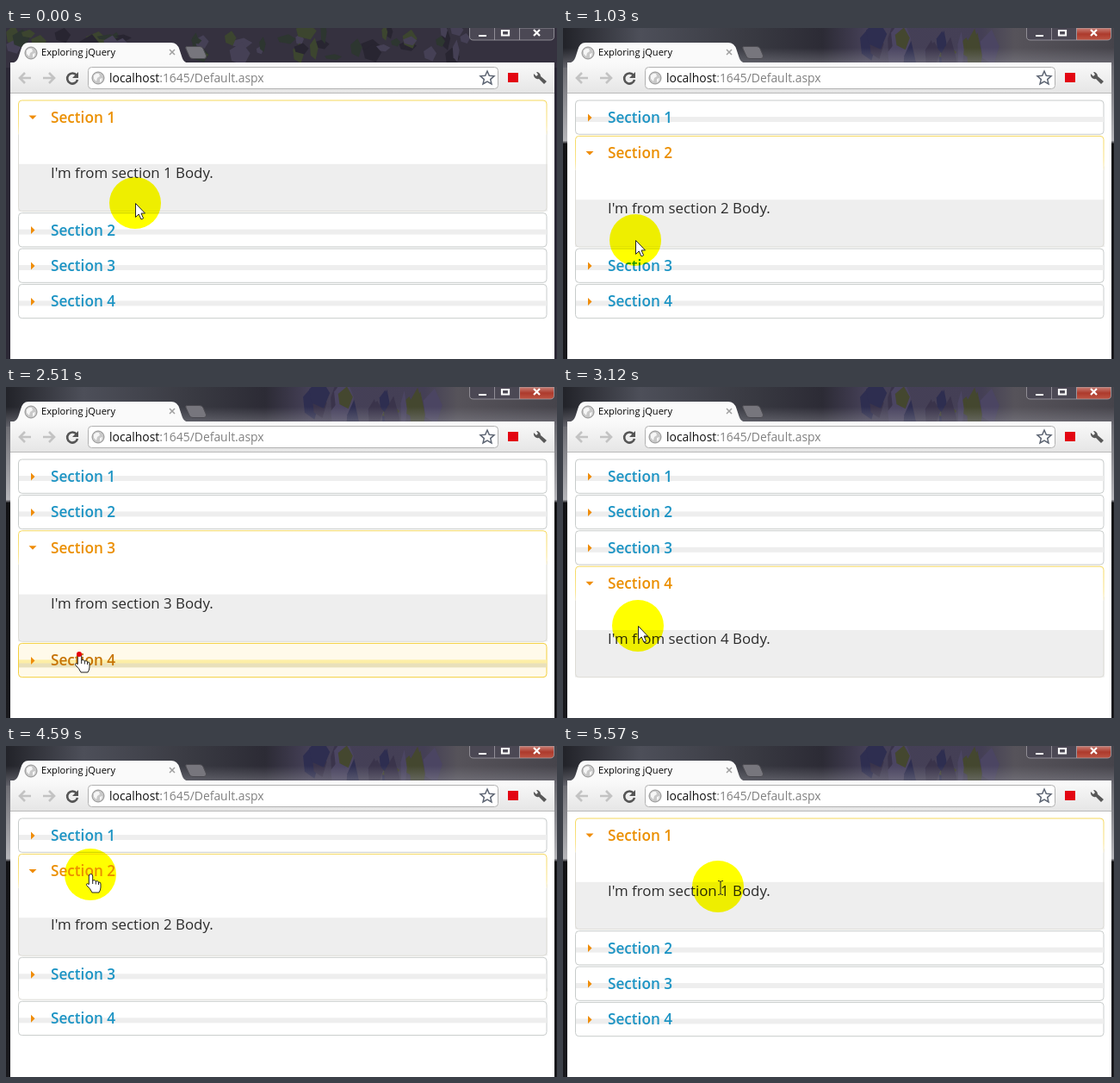
An HTML page for the animation above (5630 ms loop, 640 by 384 pixels).

```html
<!DOCTYPE html>
<html lang="en">
<head>
<meta charset="utf-8">
<title>Exploring jQuery</title>
<style>
  html, body { margin: 0; width: 100%; height: 100%; overflow: hidden; background: #fff; }
  #stage { display: block; width: 640px; height: 384px; }
  text { font-family: "Open Sans", "Noto Sans", sans-serif; white-space: pre; }
  .title { font-size: 11.1px; fill: #000; }
  .url { font-size: 13.9px; fill: #111; }
  .url .path { fill: #808080; }
  .label { font-size: 17.200px; font-weight: 600; fill: #1c94c4; }
  .copy { font-size: 16.850px; font-weight: 500; fill: #2b2b2b; }
  .box { fill: #fff; stroke: #c8cccb; }
  .band { fill: #eee; height: 6px; }
  .icon { fill: #ef8c08; }
  .frame { fill: none; stroke: #dddcd6; }
  .hover .box { fill: #fffaea; stroke: #f3cf3c; }
  .hover .band { fill: url(#warm); height: 9px; }
  .hover .label { fill: #c77405; }
  .active .box { stroke: url(#edge); }
  .active .band { display: none; }
  .active .label { fill: #eb8f00; }
  #spot { mix-blend-mode: multiply; }
</style>
</head>
<body>
<svg id="stage" viewBox="0 0 640 384">
  <defs>
    <linearGradient id="edge" x2="0" y2="1">
      <stop offset="0" stop-color="#f5d85c"/><stop offset=".75" stop-color="#fae48c"/><stop offset="1" stop-color="#f3ecd2"/>
    </linearGradient>
    <linearGradient id="warm" x2="0" y2="1">
      <stop offset=".4" stop-color="#fdeea6"/><stop offset=".5" stop-color="#e9e0bb"/>
    </linearGradient>
    <linearGradient id="bar" x2="0" y2="1">
      <stop offset="0" stop-color="#fafafa"/><stop offset="1" stop-color="#e5e5e5"/>
    </linearGradient>
    <linearGradient id="sky">
      <stop offset="0" stop-color="#222329"/><stop offset=".14" stop-color="#4d4f59"/><stop offset=".33" stop-color="#3a3b43"/>
      <stop offset=".47" stop-color="#2c2b35"/><stop offset=".55" stop-color="#454057"/><stop offset=".76" stop-color="#443f55"/>
      <stop offset=".82" stop-color="#56535a"/><stop offset="1" stop-color="#46444b"/>
    </linearGradient>
    <linearGradient id="haze" x2="0" y2="1">
      <stop offset=".5" stop-color="#8b8b94" stop-opacity="0"/><stop offset="1" stop-color="#8b8b94" stop-opacity=".6"/>
    </linearGradient>
    <linearGradient id="side" x2="0" y2="1">
      <stop offset="0" stop-color="#2a2a2f"/><stop offset=".12" stop-color="#6d6d73"/><stop offset=".34" stop-color="#b4b4b8"/>
      <stop offset=".35" stop-color="#111114"/><stop offset="1" stop-color="#19191d"/>
    </linearGradient>
    <linearGradient id="close" x2="0" y2="1">
      <stop offset="0" stop-color="#c98178"/><stop offset=".5" stop-color="#ad3a2c"/><stop offset="1" stop-color="#bd5544"/>
    </linearGradient>
    <g id="globe">
      <circle r="7" fill="#c9c9c9" stroke="#929292"/>
      <path d="M-5-3Q-2-6 1-5L2-2-1 0-2 4-5 1ZM2 1 5 0 4 4 2 5Z" fill="#f6f6f6"/>
    </g>
  </defs>

  <rect width="640" height="384" fill="url(#side)"/>
  <rect width="640" height="46" fill="url(#sky)"/>
  <g id="blots"></g>
  <rect width="640" height="46" fill="url(#haze)"/>
  <g id="dusk">
    <rect width="640" height="46" fill="#35313f"/>
    <path d="M0 46H5V384H0ZM637 46H640V384H637Z" fill="#2b2835"/>
    <g id="duskBlots"></g>
  </g>

  <g stroke="#a7a5ab" stroke-opacity=".75">
    <path id="closeBtn" d="M596.500 0H636.500V10Q636.500 14 632 14H596.500Z" fill="url(#close)"/>
    <path d="M538.500 0V10Q538.500 14 543 14H596.500V0M567.500 0V14" fill="#4b4854"/>
  </g>
  <g fill="none" stroke="#fff" stroke-width="2.200">
    <path d="M549 9H558M576 3H584V8.500H576Z"/><path d="M613 2 620 9M620 2 613 9"/>
  </g>

  <path d="M5 42V41C14 40 14 35 17 26Q19 17 26 17H192Q199 17 201.500 25C205 35 205 40 213 41V42Z" fill="#fafafa"/>
  <path d="M210 21.500H225Q228 21.500 229 24L232.500 32Q233 35.500 230 35.500H217Q214 35.500 213 33L209 24Q208 21.500 210 21.500Z" fill="#77767d" stroke="#4c4b51"/>
  <use href="#globe" x="29" y="29"/>
  <text class="title" x="41" y="32">Exploring jQuery</text>
  <path d="M190 25 196 31M196 25 190 31" stroke="#a0a0a0" stroke-width="1.500"/>

  <rect x="5" y="40" width="632" height="36" fill="url(#bar)"/>
  <path d="M5 75.500H637" stroke="#b9b9b9"/>
  <rect x="5" y="76" width="632" height="308" fill="#fff"/>
  <g fill="none" stroke="#c3c3c3" stroke-width="2.600">
    <path d="M29 58H17M22 52 16 58 22 64"/><path d="M43 58H55M50 52 56 58 50 64"/>
    <path d="M82 55A6 6 0 1 0 83 60" stroke="#555"/>
  </g>
  <path d="M84 51V58H77Z" fill="#555"/>
  <rect x="95.500" y="45.500" width="476" height="25" rx="4" fill="#fff" stroke="#b1b1b1"/>
  <use href="#globe" x="107" y="58"/>
  <text class="url" x="120" y="63">localhost<tspan class="path">:1645/Default.aspx</tspan></text>
  <path d="M559 50 561.300 55.200 567 55.800 562.700 59.600 564 65 559 62.200 554 65 555.300 59.600 551 55.800 556.700 55.200Z" fill="#fff" stroke="#5d6573" stroke-width="1.500"/>
  <rect x="583" y="52" width="12" height="11" fill="#e30613"/>
  <path d="M613 53A5 5 0 0 0 619 59L625 65 628 62 621 56A5 5 0 0 0 616 51L618 54 616 56Z" fill="#585858"/>

  <g id="list"></g>
  <circle id="spot" r="30" fill="#ff0"/>
  <g id="pointer">
    <path id="arrow" d="M.5.500V16.500L4.200 13 7 19 9.600 17.800 7 12H11.500Z" fill="#fff" stroke="#222"/>
    <path id="hand" d="M.5-.500Q2.700-.500 2.700 2V7Q5.500 5.500 6.300 8 9 6.800 9.500 9 12 8.500 12 11V15Q12 18 10 21H2Q.5 17-4.500 12.500-5 9.500-1.700 11.500V2Q-1.700-.500.500-.500ZM2.700 7V11M6.300 8V11.500M9.500 9V12" fill="#fff" stroke="#222"/>
    <path id="beam" d="M0-6.500Q2-6.500 3-5.500 4-6.500 6-6.500M3-5.500V8.500M0 9.500Q2 9.500 3 8.500 4 9.500 6 9.500" fill="none" stroke="#222"/>
  </g>
  <circle id="dot" r="3" fill="#e8000b"/>
</svg>
<script>
const LOOP = 5630, STEP = 60.6, SLIDE = 305, PRESS = 130;
const TOP = 84, HEAD = 39.3, PITCH = 41.4, BODY = 89.2;
const NS = 'http://www.w3.org/2000/svg';
const $ = id => document.getElementById(id);

const starts = [0, 2510, 3560, 5210];

// Clicks: time the slide starts, section opened
const clicks = [[600, 1], [1380, 2], [2640, 3], [3680, 2], [4350, 1], [5200, 0]];

// Pointer path: time, x, y
const path = [
  [0, 150, 203], [60, 150, 203], [430, 88, 234], [940, 88, 234],
  [1190, 77, 267], [1840, 77, 267], [2120, 85, 310], [3034, 85, 310],
  [3116, 87, 277], [3356, 96, 181], [3978, 96, 181], [4045, 98, 172],
  [4220, 98, 149], [4700, 98, 149], [4960, 95, 110], [5340, 95, 110],
  [5570, 180, 163]
];

function set(el, attrs) {
  for (const k in attrs) el.setAttribute(k, attrs[k]);
  return el;
}

function add(parent, tag, attrs, text) {
  const el = set(document.createElementNS(NS, tag), attrs);
  if (text) el.textContent = text;
  return parent.appendChild(el);
}

// Irregular patches of colour; tall stretches them vertically.
function scatter(group, seed, count, from, to, tall, colors) {
  const rnd = () => (seed = seed * 16807 % 2147483647) / 2147483647;
  for (let i = 0; i < count; i++) {
    const x = from + rnd() * (to - from), y = rnd() * 34;
    const w = 6 + rnd() * 20, h = (4 + rnd() * 14) * tall;
    add(group, 'path', {
      d: `M${x} ${y}l${w * .6} ${-h * .5} ${w * .4} ${h * .7} ${-w * .3} ${h * .8} ${-w * .6} ${-h * .3}Z`,
      fill: colors[i % colors.length]
    });
  }
}
scatter($('blots'), 71, 20, 345, 485, 2.2, ['#2e2e50', '#44472f', '#3a344b', '#4b4562']);
scatter($('duskBlots'), 39, 60, 0, 530, 1, ['#3c452f', '#282531', '#454055', '#2d3630']);

const sections = [0, 1, 2, 3].map(i => {
  const g = add($('list'), 'g');
  const body = add(g, 'svg', { x: 14, width: 615 });
  add(body, 'rect', { width: 615, height: 140, fill: '#fff' });
  add(body, 'rect', { y: 34.5, width: 615, height: 110, fill: '#eee' });
  const copy = add(body, 'text', { class: 'copy', x: 38 }, `I'm from section ${i + 1} Body.`);
  const frame = add(g, 'path', { class: 'frame' });
  const head = add(g, 'g');
  const box = add(head, 'path', { class: 'box' });
  add(head, 'rect', { class: 'band', x: 15, y: 19, width: 613 });
  const icon = add(head, 'path', { class: 'icon' });
  add(head, 'text', { class: 'label', x: 52, y: 26 }, `Section ${i + 1}`);
  return { body, copy, frame, head, box, icon };
});

const OPEN_BOX = `M14.500 ${HEAD}V4Q14.500 0 18.500 0H624Q628 0 628 4V${HEAD}`;
const SHUT_BOX = `M14.500 ${HEAD - 4}V4Q14.500 0 18.500 0H624Q628 0 628 4V${HEAD - 4}Q628 ${HEAD} 624 ${HEAD}H18.500Q14.500 ${HEAD} 14.500 ${HEAD - 4}Z`;

function tick(t) {
  const base = starts.filter(s => s <= t).pop();
  return base + Math.floor((t - base + 6) / STEP) * STEP;
}

function pointerAt(t) {
  const i = path.findIndex(p => p[0] > t);
  if (i < 0) return path[path.length - 1].slice(1);
  const [t0, x0, y0] = path[i - 1], [t1, x1, y1] = path[i];
  const k = (t - t0) / (t1 - t0);
  return [x0 + (x1 - x0) * k, y0 + (y1 - y0) * k];
}

function layout(t) {
  let open = 0, last = 0, p = 1;
  for (const [start, target] of clicks) {
    if (t < start) break;
    last = open;
    open = target;
    p = Math.min(1, (t - start) / SLIDE);
  }
  p = .5 - .5 * Math.cos(Math.PI * p);
  const lag = .037 * Math.sin(Math.PI * p);
  let y = TOP;
  const rows = sections.map((s, i) => {
    const part = i === open ? Math.max(0, p - lag) : i === last ? 1 - p : 0;
    const row = { y, part, h: part * BODY };
    y += PITCH + row.h;
    return row;
  });
  return { open, rows };
}

function draw(time) {
  const t = tick(time);
  const { open, rows } = layout(t);
  const [x, y] = pointerAt(t);
  const pressed = clicks.some(c => t >= c[0] - PRESS && t < c[0] + 150);
  let kind = pressed ? 'hand' : 'arrow';

  rows.forEach((r, i) => {
    const s = sections[i], end = r.y + HEAD + r.h;
    const textY = r.y + 68 + 16 * r.part;
    const over = y >= r.y && y <= r.y + HEAD;
    if (over) kind = 'hand';
    else if (!pressed && r.part > 0 && Math.abs(y - textY) < 10 && x > 52 && x < 241) kind = 'beam';

    const active = i === open, shown = active || r.part > 0;
    s.head.setAttribute('class', active ? 'active' : over ? 'hover' : '');
    s.head.setAttribute('transform', `translate(0 ${r.y})`);
    s.box.setAttribute('d', shown ? OPEN_BOX : SHUT_BOX);
    s.icon.setAttribute('d', active ? 'M26.500 17.500H35.500L31 22Z' : 'M29 15.500 33.500 20 29 24.500Z');
    s.body.style.display = s.frame.style.display = shown ? '' : 'none';
    set(s.body, { y: r.y + HEAD, height: r.h });
    s.copy.setAttribute('y', textY + 6 - r.y - HEAD);
    s.frame.setAttribute('d', `M14.500 ${r.y + HEAD - 4}V${end - 4}Q14.500 ${end} 18.500 ${end}H624Q628 ${end} 628 ${end - 4}V${r.y + HEAD - 4}`);
  });

  for (const id of ['arrow', 'hand', 'beam']) $(id).style.display = id === kind ? '' : 'none';
  $('pointer').setAttribute('transform', `translate(${x} ${y})`);
  set($('spot'), { cx: x, cy: y }).style.display = pressed ? 'none' : '';
  set($('dot'), { cx: x, cy: y }).style.display = pressed ? '' : 'none';
  const early = time < 60;
  $('dusk').style.display = early ? '' : 'none';
  $('closeBtn').setAttribute('fill', early ? '#4b4854' : 'url(#close)');
}

const begin = performance.now();
function run() {
  draw((performance.now() - begin) % LOOP);
  requestAnimationFrame(run);
}
run();
</script>
</body>
</html>
```
